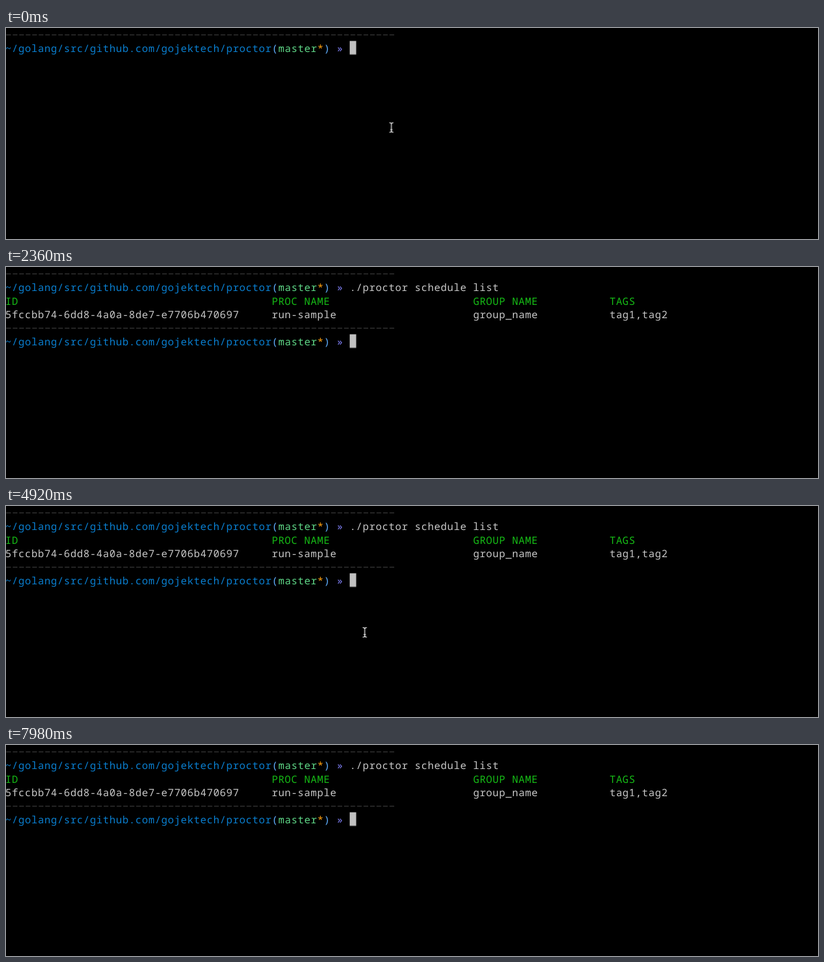
An HTML page for the animation above (8 s loop, 1280 px wide and 334 px high).

```html
<!DOCTYPE html>
<html lang="en">
<head>
<meta charset="utf-8">
<title>Schedule list in a terminal</title>
<style>
  html, body { margin: 0; width: 100%; height: 100%; overflow: hidden; background: #000; }
  svg { display: block; width: 1280px; height: 334px; }
  text {
    font: 16px "Noto Sans Mono", "DejaVu Sans Mono", monospace;
    letter-spacing: .64px; /* 10.24px terminal cell */
    text-rendering: geometricPrecision;
    fill: #c7c7c7;
  }
  .path { fill: #0a7fd0; }
  .paren { fill: #5fafff; }
  .branch { fill: #5fd787; }
  .dirty { fill: #ffa010; }
  .mark { fill: #8080f8; }
  .head text { fill: #16bb16; }
  .rule { stroke: #3a3a3a; stroke-width: 1.3; stroke-dasharray: 7.4 2.84; }
  .block { fill: #c1c1c1; }
  .beam path { fill: none; stroke: #eee; stroke-width: 1.3; }

  .command, .output, .block, .beam { animation: 8s step-end infinite; }
  .command { animation-name: command; }
  .output { animation-name: output; }
  .block { animation-name: block; }
  .beam { animation-name: beam; }
  .drift { animation: drift 8s linear infinite; }

  @keyframes command {
    0% { visibility: hidden; }
    .25%, 100% { visibility: visible; }
  }
  @keyframes output {
    0% { visibility: hidden; }
    28.25%, 100% { visibility: visible; }
  }
  @keyframes block {
    0% { transform: translate(541.8px, 20.5px); }
    .25% { transform: translate(777.3px, 20.5px); }
    19.25% { transform: translate(-.9px, 42px); }
    28.25%, 100% { transform: translate(541.8px, 106.5px); }
  }
  @keyframes beam {
    0% { visibility: visible; }
    17.25% { visibility: hidden; }
    44.5% { visibility: visible; }
    78.5%, 100% { visibility: hidden; }
  }
  @keyframes drift {
    0%, 46.5% { transform: translate(607.5px, 157.5px); }
    47.5% { transform: translate(602px, 159px); }
    50% { transform: translate(590px, 192px); }
    52.75%, 53.9% { transform: translate(586.5px, 205px); }
    58% { transform: translate(586px, 207px); }
    61.5%, 62.7% { transform: translate(565.5px, 200px); }
    68% { transform: translate(533px, 204px); }
    71.5% { transform: translate(522.5px, 207px); }
    75% { transform: translate(512px, 260px); }
    78.5%, 100% { transform: translate(502px, 346px); }
  }
</style>
</head>
<body>
<svg viewBox="0 0 1280 334">
  <defs>
    <g id="prompt">
      <path class="rule" d="M.4 10.9H612.2"/>
      <text x="-.9" y="38.3"><tspan class="path">~/golang/src/github.com/gojektech/proctor</tspan><tspan class="paren">(</tspan><tspan class="branch">master</tspan><tspan class="dirty">*</tspan><tspan class="paren">)</tspan> <tspan class="mark">»</tspan></text>
    </g>
  </defs>

  <use href="#prompt"/>
  <text class="command" x="541.8" y="38.3">./proctor schedule list</text>

  <g class="output">
    <g class="head">
      <text x="-.9" y="59.8">ID</text>
      <text x="418.9" y="59.8">PROC NAME</text>
      <text x="736.4" y="59.8">GROUP NAME</text>
      <text x="951.4" y="59.8">TAGS</text>
    </g>
    <text x="-.9" y="81.3">5fccbb74-6dd8-4a0a-8de7-e7706b470697</text>
    <text x="418.9" y="81.3">run-sample</text>
    <text x="736.4" y="81.3">group_name</text>
    <text x="951.4" y="81.3">tag1,tag2</text>
    <use href="#prompt" y="86"/>
  </g>

  <rect class="block" width="10.2" height="21.5"/>

  <g class="beam">
    <g class="drift">
      <path d="M-3.2-7.6Q0-7.6 0-5Q0-7.6 3.2-7.6M0-5.5V5.5M-3.2 7.6Q0 7.6 0 5Q0 7.6 3.2 7.6M-1.6 3.5H1.6"/>
    </g>
  </g>
</svg>
</body>
</html>
```
